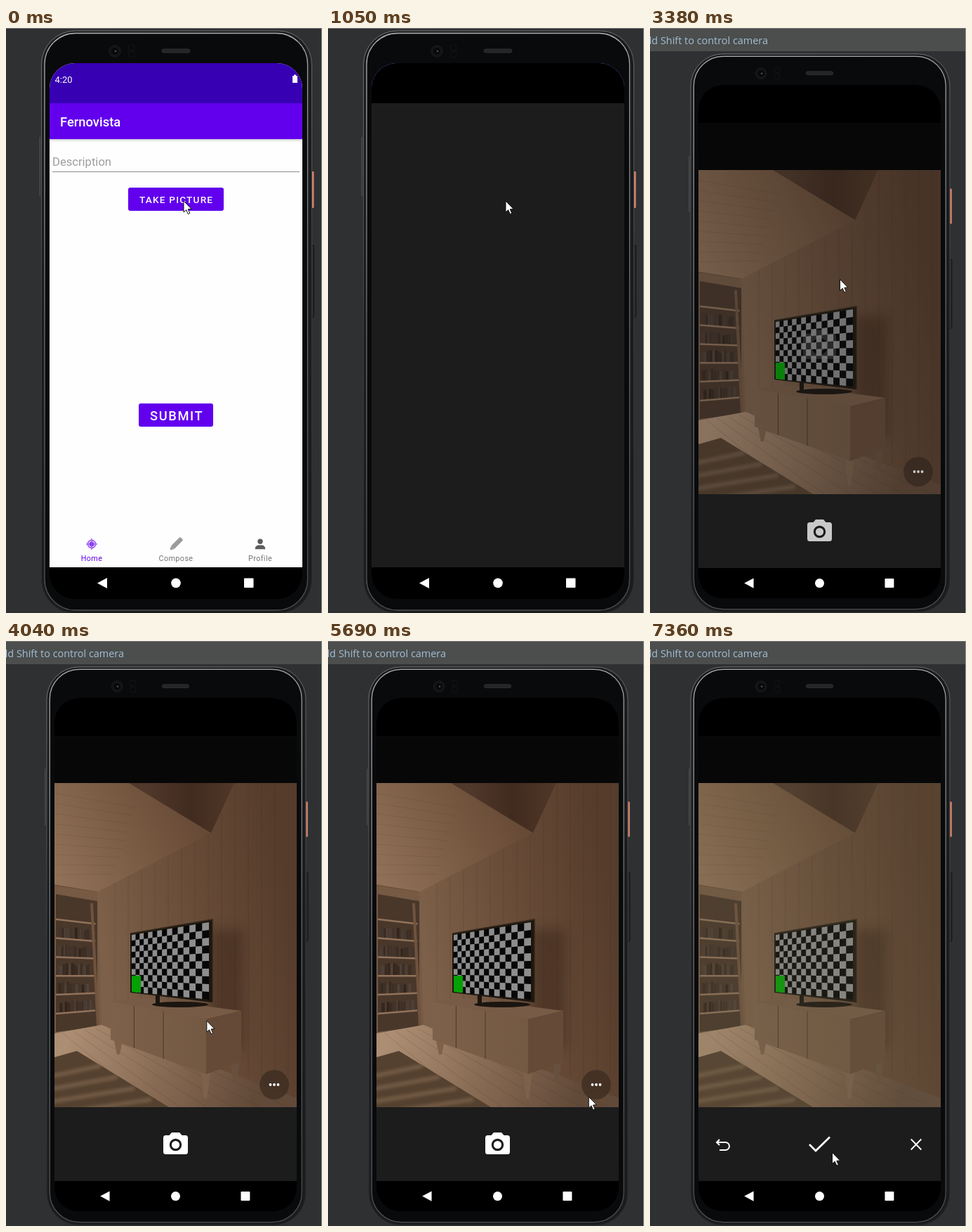
An HTML page with a canvas that plays this animation: 450x832 px, repeating every 8 s.

```html
<!DOCTYPE html>
<html lang="en">
<head>
<meta charset="utf-8">
<title>Compose and take a picture</title>
<style>
html, body { margin: 0; width: 450px; height: 832px; overflow: hidden; background: #2f3032; }
canvas { display: block; }
</style>
</head>
<body>
<canvas id="stage" width="450" height="832"></canvas>
<script>
const LOOP = 8000;
const ctx = document.getElementById('stage').getContext('2d');
const ZOOM = 345 / 360;
const PURPLE = '#6200ee';

const mix = (a, b, p) => a + (b - a) * p;
const ramp = (t, from, to) => Math.min(1, Math.max(0, (t - from) / (to - from)));
const easeOut = p => 1 - (1 - p) ** 3;
const easeInOut = p => p * p * (3 - 2 * p);

function rect(c, x, y, w, h, fill) {
  c.fillStyle = fill;
  c.fillRect(x, y, w, h);
}

function round(c, x, y, w, h, r, fill, stroke, width = 1) {
  c.beginPath();
  c.roundRect(x, y, w, h, r);
  if (fill) { c.fillStyle = fill; c.fill(); }
  if (stroke) { c.strokeStyle = stroke; c.lineWidth = width; c.stroke(); }
}

function disc(c, x, y, r, fill, ry = r) {
  c.beginPath();
  c.ellipse(x, y, r, ry, 0, 0, Math.PI * 2);
  c.fillStyle = fill;
  c.fill();
}

function trace(c, points) {
  c.beginPath();
  points.forEach(([x, y]) => c.lineTo(x, y));
}

function poly(c, points, fill) {
  trace(c, points);
  c.closePath();
  c.fillStyle = fill;
  c.fill();
}

function line(c, points, stroke, width = 1) {
  trace(c, points);
  c.strokeStyle = stroke;
  c.lineWidth = width;
  c.stroke();
}

function fade(c, x0, y0, x1, y1, ...colors) {
  const g = c.createLinearGradient(x0, y0, x1, y1);
  colors.forEach((color, i) => g.addColorStop(i / (colors.length - 1), color));
  return g;
}

function text(str, x, y, font, fill, align = 'left', spacing = 0) {
  ctx.font = font;
  ctx.fillStyle = fill;
  ctx.textAlign = align;
  ctx.letterSpacing = spacing + 'px';
  ctx.fillText(str, x, y);
  ctx.letterSpacing = '0px';
}

function seeded(seed) {
  return () => (seed = (seed * 16807) % 2147483647) / 2147483647;
}

// Maps u, v in 0..1 to a wall plane with upright sides.
function upright(x0, x1, [top0, top1], [bottom0, bottom1]) {
  const depth = (bottom0 - top0) / (bottom1 - top1);
  return (u, v) => {
    const p = u * depth / (1 - (1 - depth) * u);
    return [mix(x0, x1, p), mix(mix(top0, top1, p), mix(bottom0, bottom1, p), v)];
  };
}

function panel(c, at, u, v, w, h, fill) {
  poly(c, [at(u, v), at(u + w, v), at(u + w, v + h), at(u, v + h)], fill);
}

// ---- room shown by the camera; coordinates are those of the zoomed-out stage ----

function drawShelf(c) {
  const random = seeded(71);
  const at = upright(71, 130, [360, 370], [556, 549]);
  panel(c, at, 0, 0, 1, 1, '#49372a');
  for (let row = 1; row <= 6; row++) {
    const v = row * 0.137 + 0.045;
    for (let u = 0.04; u < 0.8 && row > 1;) {
      const w = mix(0.03, 0.09, random());
      const h = mix(0.07, 0.095, random());
      const tone = mix(36, 70, random());
      panel(c, at, u, v - h, w * 0.8, h, `rgb(${tone + 12},${tone - 2},${tone - 11})`);
      u += w;
    }
    line(c, [at(0, v), at(0.95, v)], '#91725a', 2.5);
  }
  line(c, [[122, 373], [131, 547]], '#6f533e', 4);
}

function drawTelevision(c) {
  const cols = 15, rows = 10;
  disc(c, 248, 517, 40, '#1b1510', 4);
  rect(c, 213, 500, 6, 16, '#1b1510');
  const frame = upright(177, 294, [416, 396], [500, 514]);
  panel(c, frame, 0, 0, 1, 1, '#1d1710');
  line(c, [frame(0, 0), frame(1, 0), frame(1, 1)], '#35291b', 1.5);
  const screen = upright(179, 289, [418, 400], [499, 510]);
  panel(c, screen, 0, 0, 1, 1, '#070707');
  for (let i = 0; i < cols * rows; i += 2) {
    panel(c, screen, i % cols / cols, Math.floor(i / cols) / rows, 1 / cols, 1 / rows, '#8d8d8d');
  }
  panel(c, screen, 0, 0.715, 0.155, 0.285, '#05a005');
}

function drawCabinet(c) {
  const leg = (x, y, h, fill) => poly(c, [[x - 7, y], [x + 7, y], [x + 2, y + h], [x - 2, y + h]], fill);
  leg(160, 564, 24, '#7d614b');
  leg(326, 596, 32, '#67503e');
  leg(284, 611, 40, '#7d614b');
  const front = upright(149, 285, [513, 538], [567, 616]);
  const side = upright(285, 335, [538, 526], [616, 598]);
  poly(c, [front(0, 0), [198, 508], side(1, 0), front(1, 0)], '#775b46');
  panel(c, front, 0, 0, 1, 1, fade(c, 150, 0, 285, 0, '#7d614b', '#745942'));
  panel(c, side, 0, 0, 1, 1, '#654a37');
  for (const u of [0.32, 0.64]) line(c, [front(u, 0), front(u, 1)], '#4d3829');
}

function makeRoom() {
  const canvas = document.createElement('canvas');
  canvas.width = 345;
  canvas.height = 461;
  const c = canvas.getContext('2d');
  const corner = [292, 273], eave = [130, 357];
  c.translate(-69, -202);

  rect(c, 69, 202, 345, 461, fade(c, 130, 400, 400, 350, '#7d6049', '#684c38', '#563c2b'));
  for (let x = 155; x < 414; x += 19) {
    const top = x < 292 ? mix(357, 273, (x - 130) / 162) : 202;
    line(c, [[x, top], [x, 620]], 'rgba(45,27,16,.13)');
  }

  poly(c, [[69, 202], [175, 202], corner, eave, [69, 347]],
    fade(c, 69, 330, 260, 230, '#907158', '#7b5d45', '#674a36'));
  for (let i = 1; i < 10; i++) {
    const p = i / 10;
    line(c, [[69, mix(202, 347, p)], [mix(190, 150, p), mix(225, 343, p)]], 'rgba(52,32,19,.1)');
  }
  poly(c, [[175, 202], [325, 202], corner], fade(c, 200, 202, 325, 202, '#50382a', '#412b1f', '#503727'));
  line(c, [eave, [69, 347]], '#604633');

  poly(c, [[69, 348], eave, [136, 548], [69, 560]], '#765a44');
  drawShelf(c);

  poly(c, [[69, 558], [136, 546], [414, 650], [414, 663], [69, 663]],
    fade(c, 90, 560, 350, 660, '#ac8e73', '#886b54', '#624a39'));
  for (let i = 0; i < 6; i++) {
    line(c, [[80 + i * 16, 557 - i * 2], [210 + i * 38, 663]], 'rgba(65,43,28,.18)');
  }

  c.save();
  c.filter = 'blur(8px)';
  rect(c, 290, 410, 48, 170, 'rgba(48,29,18,.4)');
  c.restore();

  poly(c, [[69, 592], [101, 583], [232, 663], [69, 663]], '#55412f');
  c.save();
  c.clip();
  c.filter = 'blur(2px)';
  for (let i = 0; i < 4; i++) {
    line(c, [[60, 620 + i * 18], [135 + i * 24, 604 + i * 16]], 'rgba(160,132,106,.4)', 6);
  }
  c.restore();

  drawCabinet(c);
  drawTelevision(c);
  return canvas;
}

const room = makeRoom();

function drawRoom(x, y, w, h, washed) {
  ctx.drawImage(room, x, y, w, h);
  if (washed) rect(ctx, x, y, w, h, 'rgba(103,98,72,.2)');
}

// ---- phone ----

function drawPhone() {
  rect(ctx, 47.5, 155, 1.5, 84, '#484a4c');
  round(ctx, 434.5, 204, 4, 52, 1, '#d3836b');
  round(ctx, 435, 309, 3.5, 102, 1, '#292a2c', '#121314');
  const rim = fade(ctx, 50, 0, 200, 832, '#77787a', '#3c3d3f', '#2a2b2d');
  round(ctx, 50.5, 4, 385, 828.5, 48, '#1b1c1e', rim);
  const edge = fade(ctx, 50, 0, 200, 832, '#b4b4b4', '#6d6e70', '#4c4d4f');
  round(ctx, 55, 7.5, 374.5, 820.5, 44, '#090a0c', edge, 1.3);
  disc(ctx, 155, 33, 9, '#141517');
  disc(ctx, 155, 33, 5, '#08090b');
  disc(ctx, 156, 33, 1.3, '#505458');
  for (const y of [24, 33.5]) round(ctx, 174.5, y, 8, 8, 2, null, '#141517');
  round(ctx, 222, 30, 40, 5, 2.5, '#252527', '#303032');
}

function drawSystemKeys() {
  rect(ctx, 62, 767, 360, 45, '#000');
  poly(ctx, [[130, 789.4], [144, 782], [144, 797]], '#fff');
  disc(ctx, 242, 789.4, 6.8, '#fff');
  round(ctx, 339, 782.5, 13.5, 13.5, 1, '#fff');
}

function drawTargetIcon(x, y) {
  const tint = '#a266f5';
  round(ctx, x - 5.5, y - 5.5, 11, 11, 5.5, null, tint, 2);
  line(ctx, [[x, y - 8], [x, y + 8]], tint, 1.5);
  line(ctx, [[x - 8, y], [x + 8, y]], tint, 1.5);
  disc(ctx, x, y, 3.5, '#8a42f2');
}

function drawPencilIcon(x, y) {
  ctx.save();
  ctx.translate(x, y);
  ctx.rotate(-Math.PI / 4);
  round(ctx, -7, -3.2, 18.5, 6.4, 1.5, '#9c9c9c');
  poly(ctx, [[-7, -3.2], [-7, 3.2], [-12, 0]], '#9c9c9c');
  ctx.restore();
}

function drawTabs() {
  const tab = (label, x, fill) => text(label, x, 758, '10.8px Roboto, sans-serif', fill, 'center', 0.4);
  drawTargetIcon(122, 734);
  drawPencilIcon(242, 734);
  disc(ctx, 362, 730.3, 3.7, '#5c5c5c');
  round(ctx, 354.8, 735.5, 14.4, 5.8, [5, 5, 0, 0], '#5c5c5c');
  tab('Home', 122, PURPLE);
  tab('Compose', 242, '#747474');
  tab('Profile', 362, '#747474');
}

function drawButton(label, y, w, size, fill, raised) {
  const x = 242 - w / 2;
  ctx.save();
  if (raised) {
    ctx.shadowColor = 'rgba(0,0,0,.35)';
    ctx.shadowBlur = 4;
    ctx.shadowOffsetY = 2;
  }
  round(ctx, x, y, w, 33, 3, fill);
  ctx.restore();
  text(label, x + 16, y + 17 + size * 0.37, `500 ${size}px Roboto, sans-serif`, '#fff', 'left', size * 0.0893);
}

function drawComposer(t) {
  rect(ctx, 62, 50, 360, 717, '#fefefe');
  rect(ctx, 62, 158, 360, 4, fade(ctx, 0, 158, 0, 162, '#cfcfcf', '#fefefe'));
  rect(ctx, 62, 50, 360, 57, '#3700b3');
  rect(ctx, 62, 107, 360, 51, PURPLE);
  text('4:20', 69.5, 78, '13px Roboto, sans-serif', '#fff');
  rect(ctx, 408, 68, 7, 10, '#fff');
  rect(ctx, 410, 66.5, 3, 2, '#fff');
  text('Fernovista', 77, 140, '500 18.4px Roboto, sans-serif', '#fff');
  text('Description', 66, 196, '16.6px Roboto, sans-serif', '#9d9d9d');
  rect(ctx, 66, 204, 352, 1, '#8b8b8b');
  const fill = t < 500 ? PURPLE : t < 780 ? '#7524ef' : '#883ef1';
  drawButton('TAKE PICTURE', 227, 136, 13.6, fill, t >= 500);
  drawButton('SUBMIT', 534, 106, 18.3, PURPLE);
  if (t >= 780) drawRoom(151, 275, 183, 244, true);
  drawTabs();
}

function drawScreen(t) {
  ctx.save();
  ctx.beginPath();
  ctx.roundRect(62, 50, 360, 762, 36);
  ctx.clip();
  if (t < 1170) drawComposer(t);
  if (t >= 900) {
    const top = mix(767, 50, easeOut(ramp(t, 830, 1170)));
    rect(ctx, 62, top, 360, 767 - top, '#1c1c1c');
    if (top < 107) rect(ctx, 62, 50, 360, 57, '#000');
  }
  drawSystemKeys();
  ctx.restore();
}

// ---- camera app ----

function cameraIcon(x, y, scale, fill) {
  const shape = new Path2D();
  shape.roundRect(-17.5, -11.5, 35, 27, 3.5);
  for (const r of [8.7, 5.6]) {
    shape.moveTo(r, 2);
    shape.arc(0, 2, r, 0, Math.PI * 2);
  }
  ctx.save();
  ctx.translate(x, y);
  ctx.scale(scale, scale);
  ctx.fillStyle = fill;
  ctx.fill(shape, 'evenodd');
  poly(ctx, [[-9, -11.5], [-5.5, -15.5], [5.5, -15.5], [9, -11.5]], fill);
  ctx.restore();
}

function drawReviewKeys() {
  const left = 95, top = 713, r = 5.5;
  line(ctx, [[left + 4, top - 4], [left, top], [left + 4, top + 4]], '#fff', 2);
  ctx.beginPath();
  ctx.moveTo(left, top);
  ctx.arc(left + 12.5, top + r, r, -Math.PI / 2, Math.PI / 2);
  ctx.lineTo(left + 4, top + 2 * r);
  ctx.stroke();
  line(ctx, [[227, 716], [236, 725], [256, 705.5]], '#fff', 2.7);
  for (const s of [-7.3, 7.3]) line(ctx, [[379 - s, 708.5], [379 + s, 723.5]], '#fff', 1.8);
}

function drawShutterRipple(t) {
  if (t < 6140 || t >= 6650) return;
  ctx.save();
  ctx.beginPath();
  ctx.rect(69, 663, 345, 106);
  ctx.clip();
  ctx.globalAlpha = 1 - ramp(t, 6500, 6800);
  disc(ctx, 259, 728, mix(60, 220, ramp(t, 6140, 6380)), '#305288');
  ctx.restore();
}

function drawCamera(t) {
  if (t < 3380) {
    if (t >= 2280) cameraIcon(241.5, 450, 1.34, `rgba(130,130,130,${0.6 * ramp(t, 2160, 2400)})`);
    return;
  }
  rect(ctx, 69, 136, 345, 66, '#070707');
  drawRoom(69, 202, 345, 461, t >= 6800);
  if (t < 7360) {
    disc(ctx, 382, 631, 21, 'rgba(59,43,33,.75)');
    for (const dx of [-5.5, 0, 5.5]) disc(ctx, 382 + dx, 631, 1.9, '#fff');
  }
  if (t < 3530) {
    rect(ctx, 69, 202, 345, 461, 'rgba(28,28,28,.24)');
    cameraIcon(241.5, 450, 1.34, 'rgba(130,130,130,.25)');
  }
  drawShutterRipple(t);
  if (t >= 7360) {
    drawReviewKeys();
  } else {
    const alpha = t < 3530 ? 0.76 : mix(1, 0.2, ramp(t, 6080, 6380));
    cameraIcon(241.5, 714.5, 1, `rgba(255,255,255,${alpha})`);
  }
}

// ---- pointer ----

const glides = [
  { from: 2590, to: 2950, x: 270.5, y: 357.5 },
  { from: 3560, to: 4430, x: 297, y: 673 },
  { from: 4430, to: 4960, x: 259.5, y: 542.5 },
  { from: 4980, to: 5390, x: 411, y: 620 },
  { from: 5540, to: 5990, x: 259.5, y: 727.5 }
];

function drawPointer(t) {
  let x = 253, y = 246;
  for (const glide of glides) {
    const p = easeInOut(ramp(t, glide.from, glide.to));
    x = mix(x, glide.x, p);
    y = mix(y, glide.y, p);
  }
  ctx.save();
  ctx.translate(x, y);
  trace(ctx, [[0, 0], [0, 16], [3.7, 12.7], [6.3, 18.6], [8.8, 17.5], [6.3, 11.8], [11.2, 11.5]]);
  ctx.closePath();
  ctx.fillStyle = '#fff';
  ctx.strokeStyle = '#111';
  ctx.lineWidth = 1;
  ctx.fill();
  ctx.stroke();
  ctx.restore();
}

function draw(t) {
  const zoomed = t >= 2010;
  rect(ctx, 0, 0, 450, 832, '#2f3032');
  ctx.save();
  if (zoomed) {
    ctx.translate(69, 81);
    ctx.scale(ZOOM, ZOOM);
    ctx.translate(-62, -50);
  }
  drawPhone();
  drawScreen(t);
  ctx.restore();
  if (zoomed) {
    rect(ctx, 0, 0, 450, 33, '#4b4e4c');
    text('Hold Shift to control camera', 168, 23, '14.45px "Open Sans", sans-serif', '#a3bdd8', 'right');
    drawCamera(t);
  }
  rect(ctx, 0, 0, 450, 1, '#777979');
  rect(ctx, 449, 0, 1, 832, '#929393');
  drawPointer(t);
}

const start = performance.now();
function tick(now) {
  draw(Math.max(0, now - start) % LOOP);
  requestAnimationFrame(tick);
}
draw(0);
requestAnimationFrame(tick);
</script>
</body>
</html>
```
